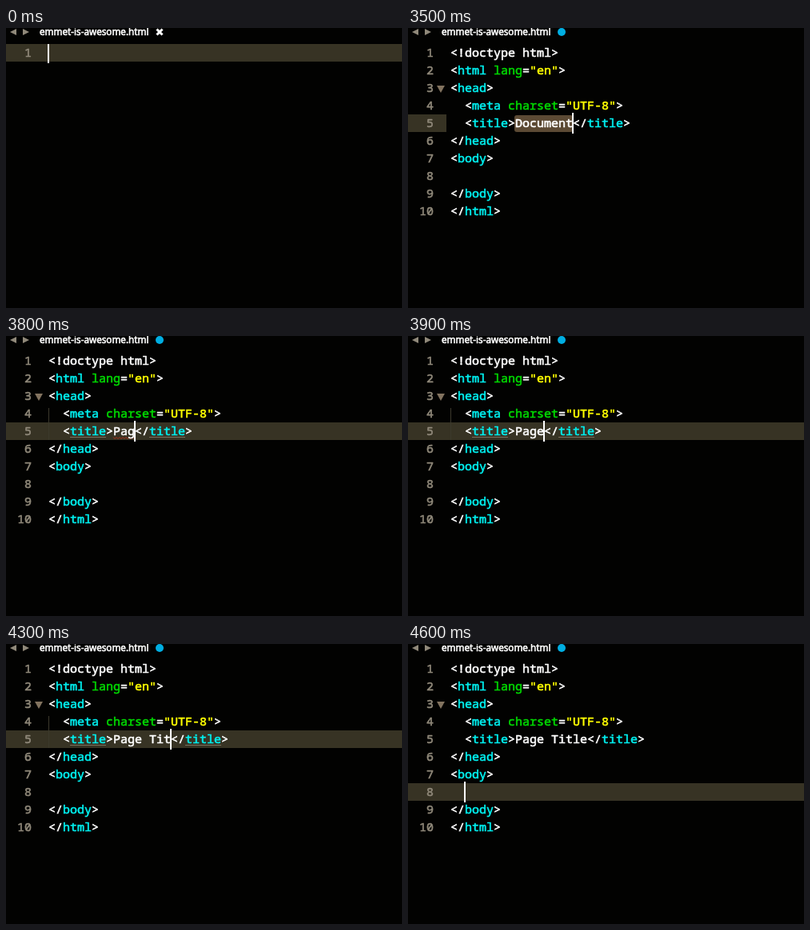
An HTML page with a canvas for the animation above (5600 ms loop, 495 px wide and 350 px high).

```html
<!DOCTYPE html>
<html lang="en">
<head>
<meta charset="utf-8">
<title>Editor typing loop</title>
<style>
  html, body { margin: 0; width: 100%; height: 100%; overflow: hidden; background: #000; }
  canvas { display: block; }
</style>
</head>
<body>
<canvas id="stage" width="495" height="350"></canvas>
<script>
const ctx = document.getElementById('stage').getContext('2d');
const LOOP = 5600, LEFT = 53, TOP = 20, CHAR = 9, ROW = 22;
const CODE_FONT = '15px "Noto Sans Mono", "DejaVu Sans Mono", monospace';
const TAB_FONT = '11.7px "Noto Sans", "Open Sans", sans-serif';
const COLORS = {
  background: '#020201', text: '#fff', tag: '#00f0f0', attr: '#00d800', string: '#ffff00',
  number: '#90897a', row: '#373324', selection: '#5c4a34',
  underline: '#7a705c', guide: '#3c392c', error: '#b03018', modified: '#00aee2'
};
const TOKENS = /(".*?")|(\w+(?==))|((?<=<\/?)\w+)|[^"<\w]+|<\/?|\w+/g;
const TITLE = 'Page Title';

const colX = col => LEFT + col * CHAR;
const rowY = row => TOP + (row - 1) * ROW;

function rect(color, x, y, w, h) {
  ctx.fillStyle = color;
  ctx.fillRect(x, y, w, h);
}

function polygon(color, ...points) {
  ctx.fillStyle = color;
  ctx.beginPath();
  points.forEach(([x, y]) => ctx.lineTo(x, y));
  ctx.fill();
}

// A thin outline gives the regular fonts a medium weight.
function text(value, x, y, color, font = CODE_FONT, align = 'left') {
  ctx.font = font;
  ctx.textAlign = align;
  ctx.fillStyle = ctx.strokeStyle = color;
  ctx.lineWidth = 0.6;
  ctx.lineJoin = 'round';
  ctx.fillText(value, x, y);
  ctx.strokeText(value, x, y);
}

function drawTab(modified) {
  polygon(COLORS.number, [5, 5], [13, 1], [13, 9]);
  polygon(COLORS.number, [29, 5], [21, 1], [21, 9]);
  text('emmet-is-awesome.html', 42, 9, COLORS.text, TAB_FONT);
  if (modified) {
    ctx.fillStyle = COLORS.modified;
    ctx.beginPath();
    ctx.arc(192, 5, 5, 0, Math.PI * 2);
    ctx.fill();
  } else {
    ctx.strokeStyle = COLORS.text;
    ctx.lineWidth = 3;
    ctx.beginPath();
    ctx.moveTo(188.5, 1.5); ctx.lineTo(195.5, 8.5);
    ctx.moveTo(195.5, 1.5); ctx.lineTo(188.5, 8.5);
    ctx.stroke();
  }
}

function drawLine(line, row) {
  const baseline = rowY(row) + 16;
  text(row, 32, baseline, COLORS.number, CODE_FONT, 'right');
  for (const match of line.matchAll(TOKENS)) {
    const [token, string, attr, tag] = match;
    const kind = string ? 'string' : attr ? 'attr' : tag ? 'tag' : 'text';
    text(token, colX(match.index), baseline, COLORS[kind]);
  }
}

function drawCursor(row, col) {
  const top = Math.max(TOP, rowY(row) - 2);
  rect(COLORS.text, colX(col) - 1, top, 2, rowY(row) + 24 - top);
}

function drawSquiggle(col, length) {
  const y = rowY(5) + 19.5;
  ctx.strokeStyle = COLORS.error;
  ctx.lineWidth = 1;
  ctx.beginPath();
  for (let x = 0; x <= length * CHAR; x += 2) ctx.lineTo(colX(col) + x, y + (x % 4 ? 1 : -1));
  ctx.stroke();
}

function drawEditing(title, time) {
  const selecting = time < 3600, typing = !selecting && time < 4600;
  const titleCol = 9, endCol = titleCol + title.length;
  if (selecting) {
    rect(COLORS.row, 0, rowY(5), 48, ROW);
    ctx.fillStyle = COLORS.selection;
    ctx.beginPath();
    ctx.roundRect(colX(titleCol) - 1, rowY(5) + 1, title.length * CHAR + 1, 21, 3);
    ctx.fill();
  } else {
    rect(COLORS.row, 0, rowY(typing ? 5 : 8), 495, ROW);
  }
  if (typing) {
    rect(COLORS.guide, LEFT, 90, 1, 40);
    for (const col of [3, endCol + 2]) rect(COLORS.underline, colX(col), rowY(5) + 18, 5 * CHAR, 1);
    const word = title.split(' ').pop();
    if (['Pag', 'Titl'].includes(word)) drawSquiggle(endCol - word.length, word.length);
  }
  [
    '<!doctype html>', '<html lang="en">', '<head>', '  <meta charset="UTF-8">',
    `  <title>${title}</title>`, '</head>', '<body>', '', '</body>', '</html>'
  ].forEach((line, i) => drawLine(line, i + 1));
  polygon('#82735f', [36, 72], [46, 72], [41, 81]);
  if (selecting || typing) drawCursor(5, endCol);
  else drawCursor(8, 2);
}

function draw(time) {
  rect(COLORS.background, 0, 0, 495, 350);
  drawTab(time >= 1000);
  if (time < 3500) {
    const typed = time < 1000 ? '' : '!';
    rect(COLORS.row, 0, TOP, 495, ROW);
    drawLine(typed, 1);
    drawCursor(1, typed.length);
  } else {
    const letters = Math.floor((time - 3500) / 100);
    drawEditing(letters ? TITLE.slice(0, letters) : 'Document', time);
  }
}

const start = performance.now();
function tick() {
  draw((performance.now() - start) % LOOP);
  requestAnimationFrame(tick);
}
tick();
</script>
</body>
</html>
```
